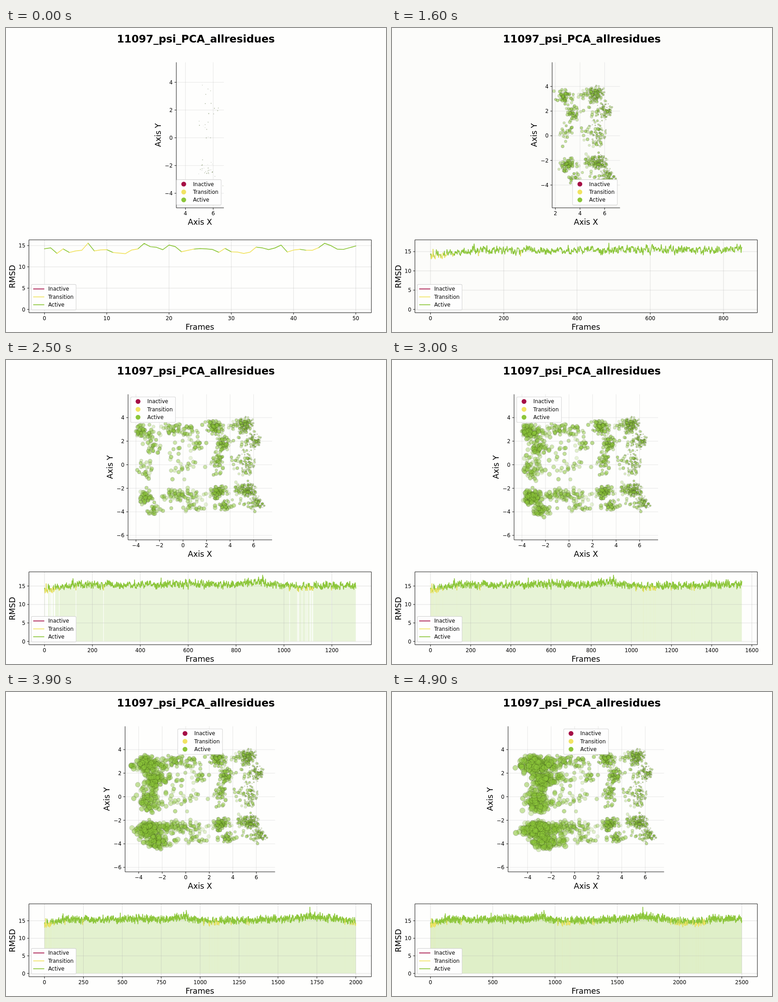
Recreate the animation shown at these times as an HTML page. Size 837 px wide and 669 px high, loop 5000 ms.

```html
<!DOCTYPE html>
<html lang="en">
<head>
<meta charset="utf-8">
<title>11097_psi_PCA_allresidues</title>
<style>
html, body { margin: 0; width: 100%; height: 100%; overflow: hidden; background: #fefefe; }
svg { display: block; width: 837px; height: 669px; }
text { font: 11.57px "DejaVu Sans", Verdana, sans-serif; fill: #000; }
.title { font-size: 23.13px; font-weight: bold; }
.label { font-size: 17.35px; }
.mid { text-anchor: middle; }
.end { text-anchor: end; }
.axis { fill: none; stroke: #000; stroke-width: .93; }
.grid { fill: none; stroke: #b0b0b0; stroke-width: .93; }
.curve { fill: none; stroke-width: 1.73; stroke-linejoin: round; stroke-linecap: square; }
.box { fill: #fefefe; stroke: #ccc; stroke-opacity: .8; stroke-width: 1.1; }
</style>
</head>
<body>
<svg viewBox="0 0 837 669">
  <rect id="bg" width="837" height="669"/>
  <text class="title mid" x="418.2" y="32">11097_psi_PCA_allresidues</text>
  <g id="dots" stroke="#000" stroke-width=".5" stroke-opacity=".8"></g>
  <path id="area"/>
  <path id="gaps" stroke-width=".5"/>
  <path id="scatterGrid" class="grid" stroke-opacity=".33"/>
  <path id="rmsdGrid" class="grid" stroke-opacity=".42"/>
  <path id="activeLine" class="curve"/>
  <path id="transitionLine" class="curve"/>
  <path id="axes" class="axis"/>
  <g id="ticks"></g>
  <text class="label mid" x="427.3" y="433">Axis X</text>
  <text class="label mid" id="yLabel">Axis Y</text>
  <text class="label mid" x="427" y="664">Frames</text>
  <text class="label mid" transform="translate(20.2 547) rotate(-90)">RMSD</text>
  <g id="scatterKey"></g>
  <g id="rmsdKey" transform="translate(55.8 564.4)"></g>
</svg>
<script>
const $ = id => document.getElementById(id);
const COLORS = { Inactive: '#a50f45', Transition: '#f1e363', Active: '#8cc63a' };
const STEP_MS = 100, STEPS = 50, PER_STEP = 50, TOTAL = STEPS * PER_STEP;
const LIMIT = 14;
const MID_X = 427.5, TOP = 75.5, BOTTOM = 395.8;
const PLOT = { l: 50.5, r: 804.8, t: 466.2, b: 626.6 };

let seed = 11097;
function rand() {
  seed = (seed + 0x6d2b79f5) | 0;
  let t = Math.imul(seed ^ (seed >>> 15), 1 | seed);
  t = (t + Math.imul(t ^ (t >>> 7), 61 | t)) ^ t;
  return ((t ^ (t >>> 14)) >>> 0) / 4294967296;
}
const bell = () => (rand() + rand() + rand() + rand() - 2) * 1.73;
const clamp = (v, lo, hi) => Math.min(hi, Math.max(lo, v));
const pick = list => list[Math.floor(rand() * list.length)];

// Piecewise linear lookup: each row is [position, value, value, ...]
function lookup(rows, p) {
  let i = 1;
  while (i < rows.length - 1 && rows[i][0] < p) i++;
  const a = rows[i - 1], b = rows[i];
  const u = clamp((p - a[0]) / (b[0] - a[0]), 0, 1);
  return a.slice(1).map((v, j) => v + (b[j + 1] - v) * u);
}

// RMSD: a drifting mean, correlated noise and the record peaks that rescale the axis
const trend = [[0, 14.15], [65, 14.2], [120, 15.3], [480, 15.5], [800, 15.5], [910, 16.2],
  [950, 15.3], [1080, 14.9], [1500, 15.4], [1710, 16.3], [1900, 15.5], [1940, 14.8],
  [2200, 14.8], [2250, 15.5]];
const peaks = { 7: 15.57, 119: 17, 487: 17.2, 911: 17.94, 1705: 18.87 };
const rmsd = [], ceiling = [];
for (let i = 0, n = 0; i <= TOTAL; i++) {
  n = n * .35 + bell() * .52;
  const [mean] = lookup(trend, i);
  const v = peaks[i] || mean + clamp(n, -1.5, 1.35);
  rmsd.push(v);
  ceiling.push(Math.max(v, ceiling[i - 1] || 0));
}

// Scatter: the walk repeats one set of basins, shifted to a new column in each phase
const basins = [
  { share: .28, dx: -.3, y: 3.1, sy: .3 },
  { share: .15, dx: .4, y: 1.8, sy: .35 },
  { share: .13, dx: -.1, y: 0, sy: .5 },
  { share: .32, dx: -.1, y: -2.4, sy: .28 },
  { share: .12, dx: .7, y: -3.5, sy: .25 }
];
const slope = x => .07 * (x - 2);
const points = [];

// Column: [centre x, spread]
function walk(end, ...columns) {
  while (points.length < end) {
    const [cx, spread] = pick(columns);
    let w = rand(), i = 0;
    while (i < basins.length - 1 && (w -= basins[i].share) > 0) i++;
    const b = basins[i];
    points.push([clamp(cx + b.dx + bell() * spread, -5.05, 6.98),
      clamp(b.y + slope(cx) + bell() * b.sy, -4.47, 4.2)]);
  }
}
const left = [-3.1, .33], right = [3, .3], middle = [0, .95];
walk(500, [5.6, .3]);
walk(850, right, right, [4.9, .45]);
walk(1300, left, left, middle, middle, right);
walk(1800, left, left, left, [-2.2, .7]);
walk(TOTAL, [-3.6, .5], left, [-2.4, .75]);

const dots = points.map((p, i) => {
  const c = document.createElementNS('http://www.w3.org/2000/svg', 'circle');
  c.setAttribute('r', (.124 * Math.sqrt(i + 1)).toFixed(2));
  c.setAttribute('fill', COLORS.Active);
  c.setAttribute('opacity', (.15 + .45 * Math.sqrt(rand())).toFixed(2));
  $('dots').append(c);
  return c;
});

// View limits by sample count: [count, xMin, xMax, yMin, yMax]
const limits = [[50, 3.34, 6.77, -5.05, 5.44], [500, 3.31, 7.17, -5.11, 5.92],
  [850, 1.74, 7.25, -5.85, 5.96], [1250, -4.67, 7.57, -6.38, 5.98], [1700, -4.67, 7.57, -6.38, 5.98],
  [2200, -5.48, 7.61, -6.38, 5.98], [2500, -5.66, 7.6, -6.38, 5.98]];

const f = v => v.toFixed(2);
const line = (x1, y1, x2, y2) => `M${f(x1)} ${f(y1)}L${f(x2)} ${f(y2)}`;
const label = (x, y, v, cls) => `<text class="${cls}" x="${f(x)}" y="${f(y)}">${String(v).replace('-', '\u2212')}</text>`;

function legend(id, textX, mark) {
  $(id).innerHTML = '<rect class="box" width="98.6" height="56" rx="2.4"/>' +
    Object.keys(COLORS).map((name, i) => {
      const y = 9.9 + i * 17.4;
      return mark(y, COLORS[name]) + label(textX, y + 4.1, name, '');
    }).join('');
}
legend('scatterKey', 36.6, (y, c) => `<circle cx="16.1" cy="${y}" r="5.3" fill="${c}"/>`);
legend('rmsdKey', 37.1, (y, c) => `<path d="M5 ${y}H27.7" stroke="${c}" class="curve"/>`);
$('activeLine').setAttribute('stroke', COLORS.Active);
$('transitionLine').setAttribute('stroke', COLORS.Transition);
$('area').setAttribute('fill', COLORS.Active);

function tickStep(range) {
  for (let e = 1; ; e *= 10)
    for (const m of [1, 2, 2.5, 5])
      if (range / (m * e) <= 9) return m * e;
}

// Grid, tick marks and labels shared by both charts
function rule(box, X, Y, xs, ys, textY) {
  const out = { grid: '', axes: '', text: '' };
  for (const v of xs) {
    out.grid += line(X(v), box.t, X(v), box.b);
    out.axes += line(X(v), box.b, X(v), box.b + 4);
    out.text += label(X(v), textY, v, 'mid');
  }
  for (const v of ys) {
    out.grid += line(box.l, Y(v), box.r, Y(v));
    out.axes += line(box.l - 4, Y(v), box.l, Y(v));
    out.text += label(box.l - 8, Y(v) + 4.2, v, 'end');
  }
  return out;
}
function multiples(lo, hi, step) {
  const list = [];
  for (let v = Math.ceil(lo / step) * step; v <= hi; v += step) list.push(v);
  return list;
}

function drawScatter(n) {
  const [x0, x1, y0, y1] = lookup(limits, n);
  const s = (BOTTOM - TOP) / (y1 - y0);
  const X = v => MID_X + (v - (x0 + x1) / 2) * s, Y = v => BOTTOM - (v - y0) * s;
  const l = X(x0), r = X(x1);
  const out = rule({ l, r, t: TOP, b: BOTTOM }, X, Y, multiples(x0, x1, 2), multiples(y0, y1, 2), 412.4);
  out.axes += `M${f(l)} ${TOP}V${BOTTOM}H${f(r)}`;
  $('scatterGrid').setAttribute('d', out.grid);
  $('yLabel').setAttribute('transform', `translate(${f(l - 34)} 235.6) rotate(-90)`);
  dots.forEach((c, i) => {
    c.style.display = i < n ? '' : 'none';
    if (i >= n) return;
    c.setAttribute('cx', f(X(points[i][0])));
    c.setAttribute('cy', f(Y(points[i][1])));
  });
  const key = n < 950 ? [r - 104.5, 333.6] : n < 2000 ? [l + 5.8, 81.3] : [MID_X - 49.3, 81.3];
  $('scatterKey').setAttribute('transform', `translate(${f(key[0])} ${key[1]})`);
  return out;
}

function drawRmsd(n) {
  const w = PLOT.r - PLOT.l, h = PLOT.b - PLOT.t;
  const X = i => PLOT.l + w * (i / n + .05) / 1.1;
  const base = PLOT.b - h * .05 / 1.1, s = h / 1.1 / ceiling[n];
  const Y = v => base - v * s;
  const out = rule(PLOT, X, Y, multiples(0, n * 1.05, tickStep(n * 1.1)), multiples(0, 15, 5), 643.4);
  out.axes += `M${PLOT.l} ${PLOT.t}H${PLOT.r}V${PLOT.b}H${PLOT.l}Z`;
  const at = i => `${f(X(i))} ${f(Y(rmsd[i]))}`;
  const paths = { active: '', transition: '' };
  let area = `M${f(X(0))} ${f(base)}`, gaps = '', last = '';
  for (let i = 0; i < n; i++) {
    const kind = rmsd[i] < LIMIT ? 'transition' : 'active';
    paths[kind] += (kind === last ? 'L' : `M${at(i)}L`) + at(i + 1);
    last = kind;
    area += 'L' + at(i);
    if (kind === 'transition')
      gaps += `M${f(X(i))} ${f(base)}L${at(i)}L${at(i + 1)}V${f(base)}Z`;
  }
  area += `L${at(n)}V${f(base)}Z`;
  $('rmsdGrid').setAttribute('d', out.grid);
  $('activeLine').setAttribute('d', paths.active);
  $('transitionLine').setAttribute('d', paths.transition);
  const filled = n >= 1100, striped = n < 1500;
  const gapColor = striped ? '#fefefe' : COLORS.Transition;
  $('area').setAttribute('d', filled ? area : '');
  $('area').setAttribute('opacity', .08 + .000078 * n);
  $('gaps').setAttribute('d', filled ? gaps : '');
  $('gaps').setAttribute('fill', gapColor);
  $('gaps').setAttribute('stroke', striped ? gapColor : 'none');
  $('gaps').setAttribute('opacity', striped ? 1 : .08);
  return out;
}

let shown = -1;
function draw(time) {
  const step = Math.floor(time / STEP_MS) % STEPS;
  if (step !== shown) {
    shown = step;
    const n = (step + 1) * PER_STEP;
    const scatter = drawScatter(n), series = drawRmsd(n);
    $('axes').setAttribute('d', scatter.axes + series.axes);
    $('ticks').innerHTML = scatter.text + series.text;
    $('bg').setAttribute('fill', n > 50 && n < 1100 ? '#fcfcfa' : '#fefefd');
  }
  requestAnimationFrame(() => draw(performance.now()));
}
draw(performance.now());
</script>
</body>
</html>
```
